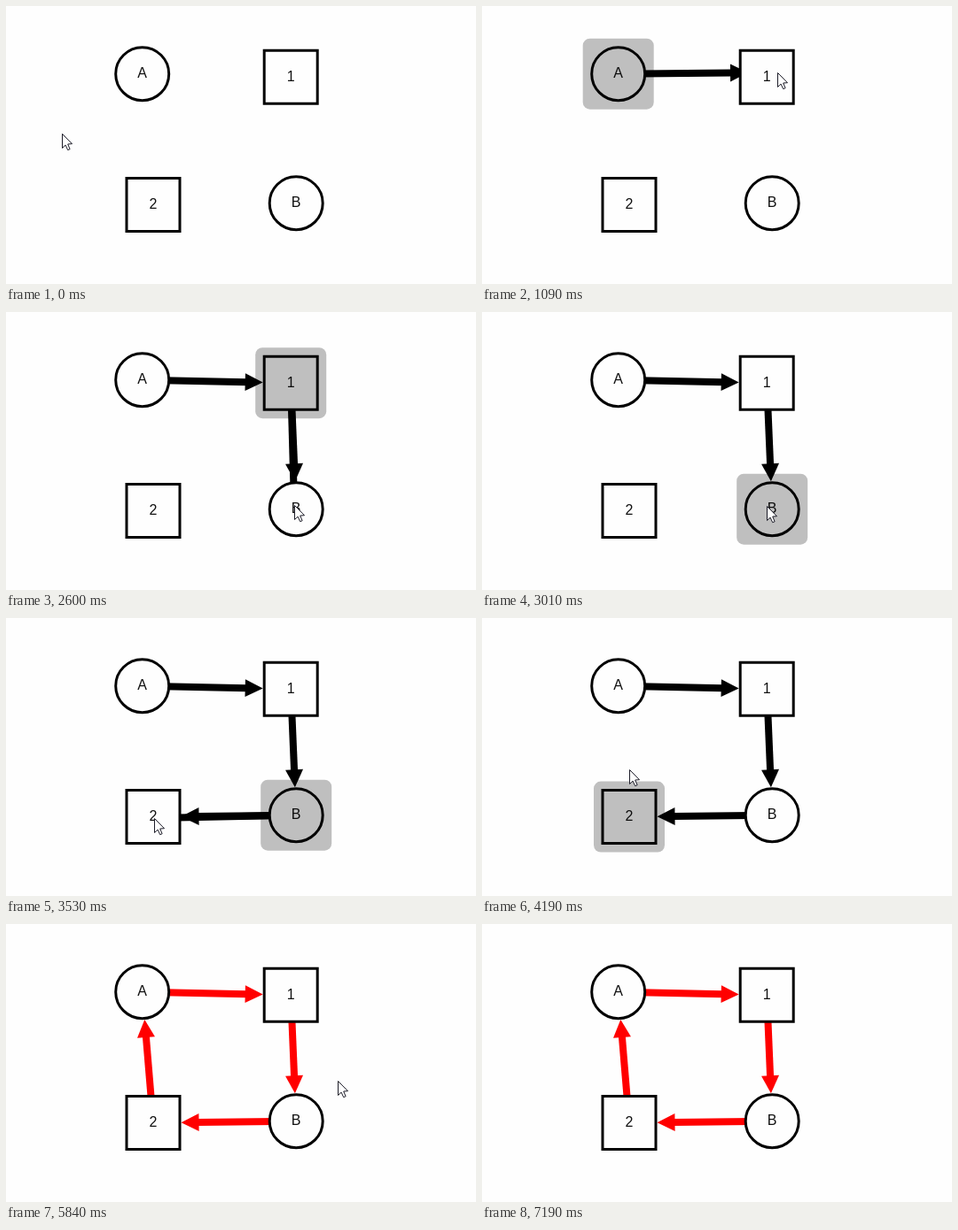
Recreate the animation shown at these times as an HTML page with a canvas. Size 530x314 px, loop 7300 ms.

```html
<!DOCTYPE html>
<html lang="en">
<head>
<meta charset="utf-8">
<title>Drawing a cycle</title>
<style>
html, body { margin: 0; width: 100%; height: 100%; overflow: hidden; background: #fefefe; }
canvas { display: block; width: 530px; height: 314px; }
</style>
</head>
<body>
<canvas id="stage"></canvas>
<script>
const W = 530, H = 314, LOOP = 7300;
const HALF = 30, BORDER = 3, EDGE = HALF + BORDER / 2, GHOST = 33;
const canvas = document.getElementById('stage');
const ctx = canvas.getContext('2d');
const dpr = window.devicePixelRatio || 1;
canvas.width = W * dpr;
canvas.height = H * dpr;

// Every node links to the next one, the last back to the first.
const nodes = [
  { label: 'A', x: 153.7, y: 76.7, round: true },
  { label: '1', x: 321.2, y: 80.2 },
  { label: 'B', x: 327.2, y: 222.7, round: true },
  { label: '2', x: 166, y: 224.6 }
];
const linkedAt = [1640, 2870, 3920, 5000];
const RED_AT = 5000, GONE_AT = 7190;

// Pointer steps: time, x, y, pressed node, snapped to the next node
const steps = [[0, 63, 144]];
const add = (...step) => steps.push(step);

function glide(start, end, count, x, y) {
  const [, x0, y0] = steps[steps.length - 1];
  for (let i = 1; i <= count; i++) {
    const t = count > 1 ? start + (end - start) * (i - 1) / (count - 1) : start;
    add(Math.round(t / 10) * 10, Math.round(x0 + (x - x0) * i / count), Math.round(y0 + (y - y0) * i / count));
  }
}

glide(270, 540, 3, 147, 72);
add(820, 149, 72, 0);
add(950, 243, 74, 0);
add(1090, 333, 75, 0);
add(1230, 338, 78, 0, true);
add(1360, 334, 79, 0, true);
add(1640, 329, 80);
add(1770, 325, 81);
add(1900, 324, 82, 1);
add(2040, 323, 104, 1);
add(2180, 323, 138, 1);
add(2320, 324, 172, 1);
add(2460, 325, 202, 1, true);
add(2600, 325, 218, 1, true);
add(2870, 325, 218);
add(3000, 321, 219, 2);
add(3140, 290, 221, 2);
add(3270, 245, 223, 2);
add(3400, 196, 225, 2, true);
add(3530, 167, 226, 2, true);
add(3920, 167, 226);
add(4050, 167, 214, 3);
add(4190, 166, 171, 3);
add(4310, 163, 138, 3);
add(4460, 158, 104, 3, true);
add(4610, 154, 83, 3, true);
add(5000, 154, 83);
glide(5140, 5840, 6, 374, 177);
add(5990, 409, 218);
glide(6140, 7070, 8, 515, 313);

function line(from, to, color) {
  ctx.strokeStyle = color;
  ctx.lineWidth = 8;
  ctx.beginPath();
  ctx.moveTo(from.x, from.y);
  ctx.lineTo(to.x, to.y);
  ctx.stroke();
}

function arrow(from, to, gap, color) {
  const dx = to.x - from.x, dy = to.y - from.y;
  const len = Math.hypot(dx, dy);
  const reach = len - gap;
  if (reach <= EDGE) return;
  ctx.save();
  ctx.translate(from.x, from.y);
  ctx.rotate(Math.atan2(dy, dx));
  line({ x: 0, y: 0 }, { x: Math.max(0, reach - 18), y: 0 }, color);
  ctx.fillStyle = color;
  ctx.beginPath();
  ctx.moveTo(reach, 0);
  ctx.lineTo(reach - 20, -10);
  ctx.lineTo(reach - 20, 10);
  ctx.fill();
  ctx.restore();
}

function link(i, color) {
  const from = nodes[i], to = nodes[(i + 1) % nodes.length];
  const dx = Math.abs(to.x - from.x), dy = Math.abs(to.y - from.y);
  const gap = to.round ? EDGE : EDGE * Math.hypot(dx, dy) / Math.max(dx, dy);
  arrow(from, to, gap, color);
}

function drawNode({ label, x, y, round }) {
  ctx.beginPath();
  if (round) ctx.arc(x, y, HALF, 0, Math.PI * 2);
  else ctx.rect(x - HALF, y - HALF, HALF * 2, HALF * 2);
  ctx.fillStyle = '#fefefe';
  ctx.fill();
  ctx.strokeStyle = '#000';
  ctx.lineWidth = BORDER;
  ctx.stroke();
  ctx.fillStyle = '#111';
  ctx.fillText(label, x, y);
}

function drawOverlay({ x, y }) {
  ctx.fillStyle = 'rgba(0, 0, 0, 0.25)';
  ctx.beginPath();
  ctx.roundRect(x - 40, y - 40, 80, 80, 8);
  ctx.fill();
}

function drawPointer(x, y) {
  ctx.save();
  ctx.translate(x + 0.5, y + 0.5);
  ctx.beginPath();
  ctx.moveTo(0, 0);
  for (const [px, py] of [[0, 16], [3.6, 12.6], [6.2, 18.2], [8.6, 17.2], [6.2, 11.5], [11, 11.2]]) ctx.lineTo(px, py);
  ctx.closePath();
  ctx.fillStyle = '#fff';
  ctx.fill();
  ctx.strokeStyle = '#1c1c28';
  ctx.lineWidth = 1;
  ctx.stroke();
  ctx.restore();
}

function draw(t) {
  const [, x, y, pressed, snapped] = steps.findLast(step => step[0] <= t);
  const color = t >= RED_AT ? '#f00' : '#000';
  ctx.setTransform(dpr, 0, 0, dpr, 0, 0);
  ctx.fillStyle = '#fefefe';
  ctx.fillRect(0, 0, W, H);
  ctx.font = '16px "Liberation Sans", Arial, sans-serif';
  ctx.textAlign = 'center';
  ctx.textBaseline = 'middle';

  linkedAt.forEach((at, i) => { if (t >= at) link(i, color); });
  if (snapped) {
    link(pressed, color);
    line(nodes[pressed], { x, y }, color);
  } else if (pressed !== undefined) {
    arrow(nodes[pressed], { x, y }, GHOST, color);
  }
  nodes.forEach(drawNode);
  if (pressed !== undefined) drawOverlay(nodes[pressed]);
  if (t < GONE_AT) drawPointer(x, y);
}

function tick() {
  draw(performance.now() % LOOP);
  requestAnimationFrame(tick);
}
tick();
</script>
</body>
</html>
```
